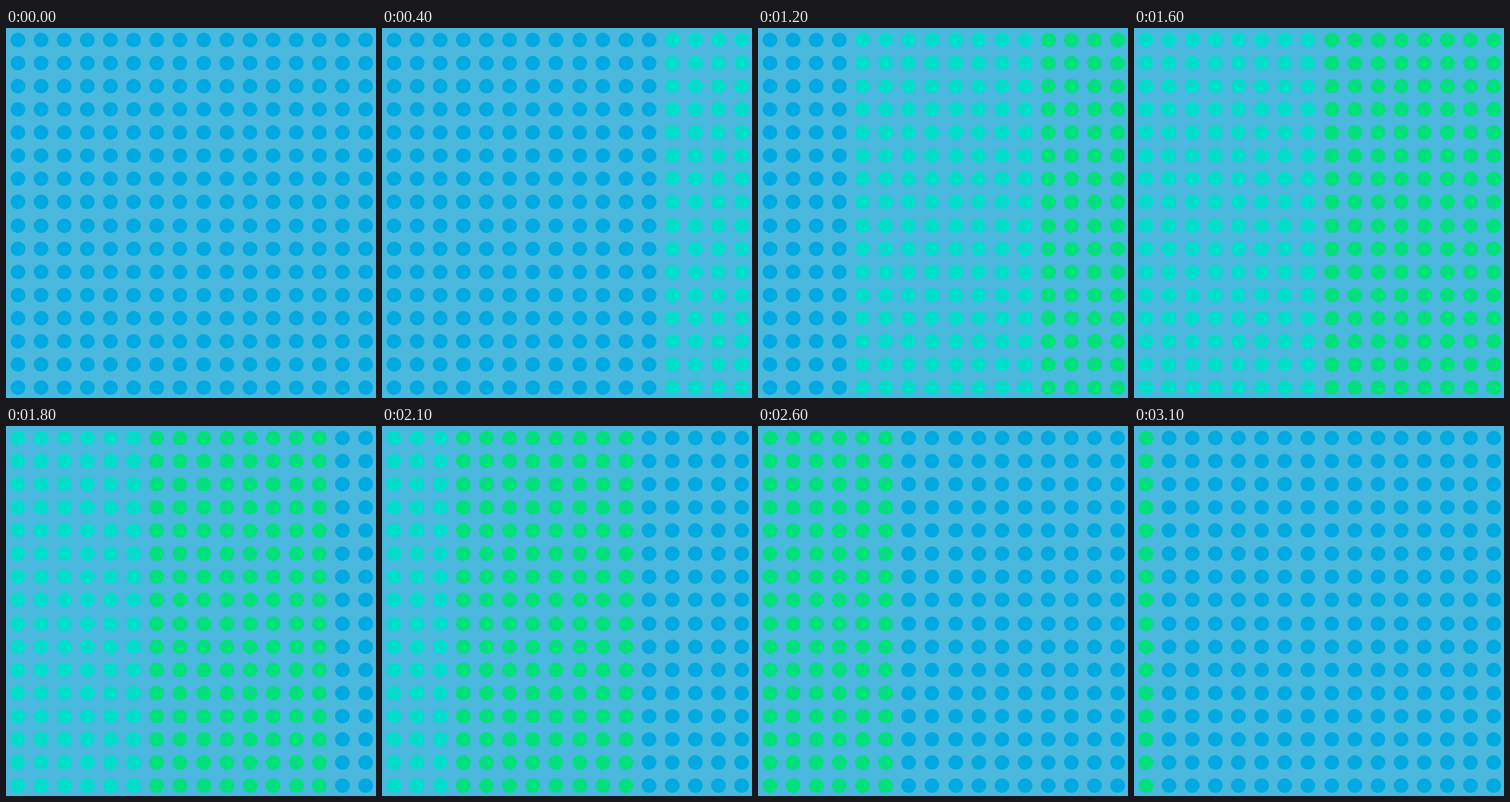
Animation, 480 px wide and 480 px high, one loop 3.2 s. Source, as an HTML page:

```html
<!DOCTYPE html>
<html lang="en">
<head>
<meta charset="utf-8">
<title>Dot waves</title>
<style>
  html, body { margin: 0; width: 100%; height: 100%; overflow: hidden; background: #4bb8dd; }
  svg { display: block; width: 100%; height: 100%; }
  g { animation: wave 3.2s step-end infinite; }
  @keyframes wave {
    0%, 100% { fill: #00aae0; }
    50% { fill: #00decb; }
    75% { fill: #00e07c; }
  }
</style>
</head>
<body>
<svg id="stage" viewBox="0 0 480 480"></svg>
<script>
  const COUNT = 16, STEP = 100, RADIUS = 9.6;
  const indices = [...Array(COUNT).keys()];

  // The grid pitch is 30px, with one extra pixel at the middle.
  const center = i => 15.5 + 30 * i + (i >= COUNT / 2 ? 1 : 0);

  const dot = (col, row) =>
    `<circle cx="${center(col)}" cy="${center(row)}" r="${RADIUS}"/>`;

  // Each column runs one step ahead of its left neighbour.
  const column = col =>
    `<g style="animation-delay:${-col * STEP}ms">${indices.map(row => dot(col, row)).join('')}</g>`;

  document.getElementById('stage').innerHTML = indices.map(column).join('');
</script>
</body>
</html>
```
